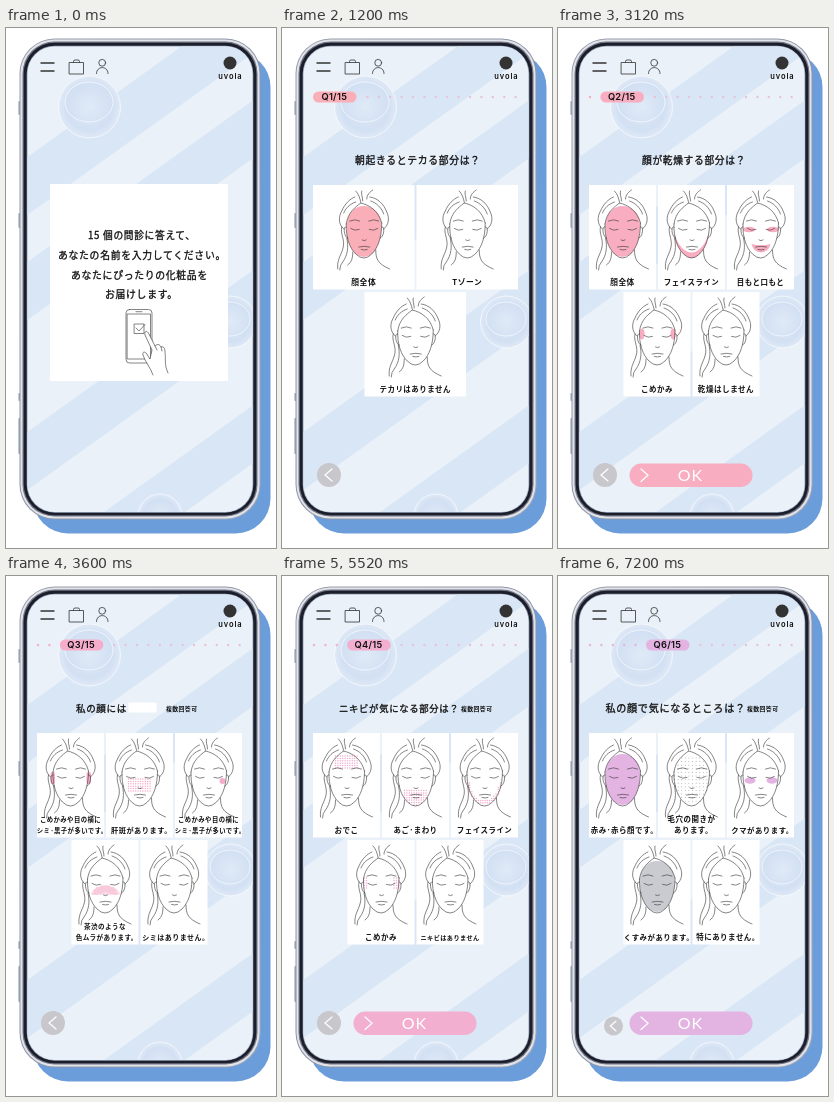
Recreate the animation shown at these times as an HTML page. Size 270 px wide and 520 px high, loop 8 s.

```html
<!DOCTYPE html>
<html lang="ja">
<head>
<meta charset="utf-8">
<title>Skin quiz</title>
<style>
html, body { margin: 0; width: 100%; height: 100%; overflow: hidden; background: #fff; }
svg { display: block; width: 100vw; height: 100vh; }
text { font-family: "Noto Sans CJK JP", "Noto Sans CJK", sans-serif; fill: #111; }
.jp { stroke: #111; stroke-width: .3; letter-spacing: .07em; }
.label, .note { font-weight: 700; stroke: none; }
.num { font: 600 9.3px Inter, sans-serif; letter-spacing: .3px; }
.ok { font: 400 16px Lato, sans-serif; letter-spacing: 1px; fill: #fff; }
.brand { font: 600 7.5px Inter, sans-serif; letter-spacing: .9px; }
.line { fill: none; stroke: #333; stroke-width: .6; stroke-linecap: round; stroke-linejoin: round; }
.icon { stroke-width: .8; }
</style>
</head>
<body>
<svg viewBox="0 0 270 520">
  <defs>
    <clipPath id="screen"><rect x="21.5" y="18.5" width="225" height="465.5" rx="27"/></clipPath>
    <linearGradient id="metal" x1="0" y1="0" x2="1" y2="1">
      <stop offset="0" stop-color="#9ba0ac"/><stop offset=".5" stop-color="#8b93a6"/><stop offset="1" stop-color="#a6acba"/>
    </linearGradient>
    <radialGradient id="glass">
      <stop offset="0" stop-color="#e0eaf7"/><stop offset=".75" stop-color="#d2e0f3"/><stop offset="1" stop-color="#dfe9f6"/>
    </radialGradient>
    <g id="face" class="line">
      <path d="M-17.5 39C-18 53 -14 63 -8 69Q0 77 8 69C14 63 18 53 18 38"/>
      <path d="M-3 18C-8 22 -16 27 -17.5 39M-3 18C6 20 15 26 18 38"/>
      <path d="M-20 44C-26 39 -25 31 -22 26C-19 19 -14 14 -9 12M6 12C14 13 20 19 23 27C26 33 25 40 20 44"/>
      <path d="M-3 17C-4 13 -5 9 -8 6M-1 16C-1 12 -3 9 -2 6M3 14C3 10 6 7 9 5"/>
      <path d="M-8 17C-14 19 -18 23 -20 28M7 16C13 18 18 23 20 29"/>
      <path d="M-17.500 42C-21 40 -20 52 -16 53M18 42C21.500 40 20.500 52 16.500 53"/>
      <path d="M-22 42C-24 49 -18 55 -21 64C-23 71 -27 75 -26 84M-17 53C-15 62 -16 70 -21 77Q-24 80 -24 85"/>
      <path d="M12 65C12 74 14 79 26 84M-11 67C-11 73 -12 77 -16 80"/>
      <path d="M-14 36Q-9 33.500 -4 36M5 36Q10 33.500 15 36"/>
      <path d="M-13 43.500Q-9 46.500 -4.500 44.500M5.500 44.500Q10 46.500 14 43.500"/>
      <path d="M-1.500 55Q.5 56.500 2.500 55M-5 62Q.5 60.500 6 62M-2.500 64.500Q.5 65.500 3.500 64.500"/>
    </g>
  </defs>

  <rect x="27" y="24" width="237.500" height="481.500" rx="35" fill="#6c9ddb"/>
  <g fill="#9ba5b8">
    <rect x="12.400" y="73" width="3" height="14" rx="1"/>
    <rect x="12.400" y="185" width="3" height="15" rx="1"/>
    <rect x="12.400" y="365" width="3" height="8" rx="1"/>
    <rect x="12.400" y="390" width="3" height="36" rx="1"/>
  </g>
  <rect x="13.500" y="10.500" width="241" height="481" rx="35" fill="url(#metal)"/>
  <rect x="14.500" y="11.500" width="239" height="479" rx="34" fill="#e3e4ea"/>
  <rect x="16.500" y="13.500" width="235" height="475" rx="32" fill="#6f7484"/>
  <rect x="17.700" y="14.700" width="232.600" height="472.600" rx="31" fill="#1c1f2b"/>
  <rect x="20.700" y="17.700" width="226.600" height="467" rx="28" fill="#9aa6bb"/>
  <g clip-path="url(#screen)">
    <rect x="21" y="18" width="226" height="467" fill="#eaf1f8"/>
    <g id="bands" fill="#d9e6f6"></g>
    <g fill="url(#glass)" stroke="#fff" stroke-opacity=".6">
      <circle cx="83.500" cy="79" r="31"/><circle cx="224.500" cy="294" r="26"/><circle cx="154" cy="488" r="22"/>
    </g>
    <g fill="none" stroke="#fff" stroke-opacity=".6">
      <ellipse cx="83" cy="74" rx="24" ry="20"/><ellipse cx="224" cy="291" rx="20" ry="17"/>
    </g>
  </g>

  <g class="line icon">
    <path stroke-width="1.400" d="M35 35H48M35 43H48"/>
    <path d="M63.500 34.500H77.500V46H63.500ZM67.500 34.500V33.500Q67.500 32 69 32H72Q73.500 32 73.500 33.500V34.500"/>
    <circle cx="96.200" cy="34.800" r="3.400"/><path d="M90.500 45.500C90.500 37.500 102 37.500 102 45.500"/>
  </g>
  <circle cx="224" cy="35" r="6.500" fill="#333"/>
  <text class="brand" x="224.400" y="50.500" text-anchor="middle">uvola</text>
  <g id="view"></g>
</svg>
<script>
const STEP = 1200, LOOP = 8000;
const view = document.getElementById('view');

const path = (d, style) => `<path d="${d}" ${style}/>`;
const rect = (x, y, w, h, fill, r = 0) =>
  `<rect x="${x}" y="${y}" width="${w}" height="${h}" rx="${r}" fill="${fill}"/>`;
const oval = (x, y, rx, ry, fill) =>
  `<ellipse cx="${x}" cy="${y}" rx="${rx}" ry="${ry}" fill="${fill}"/>`;
const text = (s, x, y, size, anchor = 'start', cls = '') =>
  `<text class="${cls}" x="${x}" y="${y}" font-size="${size}" text-anchor="${anchor}">${s}</text>`;
// pitch: advance of one character, including its letter spacing
const jp = (s, x, y, pitch, anchor, cls = '') =>
  text(s, x, y, (pitch / 1.07).toFixed(2), anchor, 'jp ' + cls);
const pen = (c, w) => `fill="none" stroke="${c}" stroke-width="${w}" stroke-linecap="round"`;

// Grid of dots wherever inside(x, y) holds
function dots(x0, y0, x1, y1, gap, r, fill, inside = () => true) {
  let out = '';
  for (let y = y0; y <= y1; y += gap)
    for (let x = x0; x <= x1; x += gap)
      if (inside(x, y)) out += `<circle cx="${x.toFixed(1)}" cy="${y.toFixed(1)}" r="${r}" fill="${fill}"/>`;
  return out;
}
const inFace = (x, y, k = 1) => (x / 17.5 / k) ** 2 + ((y - 46) / 26 / k) ** 2 < 1;
const pair = (x, y, rx, ry, c) => oval(-x + .5, y, rx, ry, c) + oval(x + .5, y, rx, ry, c);

const marks = {
  none: () => '',
  full: c => path('M-17 39C-16 28 -9 21 0 21C9 21 17 28 17.500 39C18 53 14 63 8 69Q0 75 -8 69C-14 63 -18 53 -17 39Z', `fill="${c}"`),
  jaw: c => path('M-17.500 46C-16 59 -13 64 -8 69Q0 77 8 69C13 64 16 59 17.500 46C15 57 11 62 7 65Q0 70 -7 65C-11 62 -15 57 -17.500 46Z', `fill="${c}"`),
  eyesMouth: c => pair(12, 44.500, 6, 2.700, c) + path('M-9 59Q.5 61.500 10 59Q8 67 .5 67.500Q-7 67 -9 59Z', `fill="${c}"`),
  temples: c => pair(15.500, 42, 2.600, 5.500, c),
  sides: c => rect(-20, 39, 4.500, 12, c, 2) + rect(16, 39, 4.500, 12, c, 2),
  nose: c => dots(-11, 46, 13, 59, 2.400, .75, c),
  spot: c => oval(14, 48, 3, 3, c),
  mask: c => path('M-14 54C-11 43 12 43 15 54Q8 56 .5 52Q-7 56 -14 54Z', `fill="${c}" opacity=".45"`)
    + dots(-12, 46, 13, 54, 2, .7, c, (x, y) => y > 44 + x * x / 18),
  brow: c => dots(-11, 23, 12, 35, 2.400, .75, c),
  chin: c => dots(-11, 57.500, 13, 72, 2.400, .75, c, inFace),
  jawDots: c => dots(-17, 50, 17, 73, 2.200, .75, c, (x, y) => inFace(x, y) && !inFace(x, y, .83)),
  templeDots: c => dots(-17, 38, 18, 48, 2.500, .75, c, x => Math.abs(x) > 12.500),
  smile: c => path('M-4 54Q-9 57 -9 64M5 54Q10 57 10 64', pen(c, 1.300)),
  frown: c => path('M-2 36V42M.5 36V42M3 36V42', pen(c, 1)),
  forehead: c => path([0, 1, 2, 3].map(i => `M${-11 - i * .5} ${25 + i * 3.500}Q.5 ${22 + i * 3.500} ${12 + i * .5} ${25 + i * 3.500}`).join(''), pen(c, 1.300)),
  underEye: c => path('M-14 47Q-9 51 -4 47.500M5 47.500Q10 51 15 47', pen(c, 1.500)),
  pores: () => dots(-17, 25, 18, 71, 3.600, .5, '#aaa', inFace),
  bags: c => pair(11, 47.500, 5.500, 3.200, c),
  dull: () => marks.full('#c9cbd1')
};

// title: [text, x, pitch]; cards: [label lines, pitch, mark]
const screens = [
  { tint: '#f9aeb8', title: ['朝起きるとテカる部分は？', 73, 10.500], wide: true,
    cards: [['顔全体', 8.300, 'full'], ['Tゾーン', 8.300, 'none'], ['テカリはありません', 8, 'none']] },
  { tint: '#f8adc0', title: ['顔が乾燥する部分は？', 84, 10.400], ok: true,
    cards: [['顔全体', 8.200, 'full'], ['フェイスライン', 8, 'jaw'], ['目もと口もと', 8, 'eyesMouth'],
      ['こめかみ', 8, 'temples'], ['乾燥はしません', 8.100, 'none']] },
  { tint: '#f5adc9', title: ['私の顔には', 70, 10.200], note: 160, blank: true,
    cards: [['こめかみや目の横に|シミ･黒子が多いです。', 6.800, 'sides'], ['肝斑があります。', 7.700, 'nose'],
      ['こめかみや目の横に|シミ･黒子が多いです。', 6.800, 'spot'], ['茶渋のような|色ムラがあります。', 7, 'mask'], ['シミはありません。', 7.500, 'none']] },
  { tint: '#f2afd0', title: ['ニキビが気になる部分は？', 57, 10.050], note: 179, ok: true,
    cards: [['おでこ', 8, 'brow'], ['あご･まわり', 8, 'chin'], ['フェイスライン', 8, 'jawDots'],
      ['こめかみ', 8, 'templeDots'], ['ニキビはありません', 6.600, 'none']] },
  { tint: '#ebb1da', title: ['顔のたるみ､シワが気になる部分は？', 51.500, 10],
    cards: [['ほうれい線', 8, 'smile'], ['眉間', 8, 'frown'], ['おでこ横じわ', 8, 'forehead'],
      ['目の下', 8, 'underEye'], ['たるみ､しわは|ありません。', 8, 'none']] },
  { tint: '#e3b4e2', title: ['私の顔で気になるところは？', 47.500, 10.800], note: 189, ok: true, smallBack: true,
    cards: [['赤み･赤ら顔です。', 8, 'full'], ['毛穴の開きが|あります。', 8, 'pores'], ['クマがあります。', 7.900, 'bags'],
      ['くすみがあります。', 7.900, 'dull'], ['特にありません。', 8, 'none']] }
];

function intro() {
  return rect(44, 156, 178, 197, '#fff')
    + jp('15 個の問診に答えて、', 82, 211, 10.400)
    + jp('あなたの名前を入力してください。', 52, 231, 10.550)
    + jp('あなたにぴったりの化粧品を', 65, 251, 10.550)
    + jp('お届けします。', 99, 270, 10.550)
    + `<g class="line">
      <rect x="120" y="281.500" width="26" height="53.500" rx="3.500"/>
      <path d="M121.500 286H144.500V331H121.500ZM130 283.700H136M128.500 296H138V305.500H128.500ZM130 300L133 303L139 296.500"/>
      <path fill="#fff" d="M147 347C145 340 139 334 137 327C136 323 140 323 142 328L144 331L146 322L139 307C138 303 141 302 143 306L149 318C152 315 154 317 155 319C158 318 159 321 159 324C160 332 158 336 162 345"/>
      <path d="M149 318L151 322M155 319L156 323"/></g>`;
}

function progress(i, tint) {
  const gap = 11.400, x = 31 + i * gap;
  let out = '';
  for (let k = 0; k < 15; k++)
    if (k !== i) out += oval((k < i ? 32 : 74) + k * gap, 69, 1.200, 1.200, k < i ? tint : '#e7c3d8');
  return out + rect(x, 63.500, 43.500, 11, tint, 5.500)
    + text(`Q${i + 1}/15`, x + 21.300, 72.300, 9.300, 'middle', 'num');
}

function card([label, pitch, mark], i, wide, tint) {
  const w = wide ? 101.500 : 67, low = i >= (wide ? 2 : 3);
  const x = wide ? [31, 134.500, 82.500][i] : [31, 100, 169, 65.500, 134.500][i];
  const lines = label.split('|');
  const rows = lines.map((s, n) => jp(s, s.endsWith('。') ? pitch / 4 : 0,
    99.800 - (lines.length - 1 - n) * 10.500, pitch, 'middle', 'label')).join('');
  return `<g transform="translate(${x + w / 2} ${low ? 264 : 157})">${rect(-w / 2, 0, w, 104.500, '#fff')}
    ${marks[mark](tint)}<use href="#face"/>${rows}</g>`;
}

function buttons(s) {
  const [x, y, r] = s.smallBack ? [55.500, 450, 9.500] : [47, 447, 12];
  const k = r / 12;
  let out = oval(x, y, r, r, '#c8c7cb')
    + path(`M${x + 3 * k} ${y - 6 * k}L${x - 4 * k} ${y}L${x + 3 * k} ${y + 6 * k}`, pen('#fff', 1.200));
  if (s.ok) out += rect(71.500, 435.500, 123, 23.500, s.tint, 11.750)
    + path('M83 441L90 447.300L83 453.500', pen('#fff', 1.200))
    + text('OK', 132.500, 453, 16, 'middle', 'ok');
  return out;
}

function question(i) {
  const s = screens[i], [title, x, pitch] = s.title;
  return progress(i, s.tint) + jp(title, x, 136, pitch)
    + (s.blank ? rect(122.500, 126.500, 28, 10, '#fff') : '')
    + (s.note ? jp('複数回答可', s.note, 135, 6.300, 'start', 'note') : '')
    + s.cards.map((c, n) => card(c, n, s.wide, s.tint)).join('') + buttons(s);
}

// Diagonal light bands, given by their height at the left edge
document.getElementById('bands').innerHTML = [130, 235, 405, 540]
  .map(y => path(`M20 ${y}l230 -165v58l-230 165Z`, '')).join('');

let shown = -1;
function draw(ms) {
  const n = Math.floor(ms % LOOP / STEP);
  if (n === shown) return;
  shown = n;
  view.innerHTML = n ? question(n - 1) : intro();
}

const start = performance.now();
function tick() {
  draw(performance.now() - start);
  requestAnimationFrame(tick);
}
tick();
</script>
</body>
</html>
```
